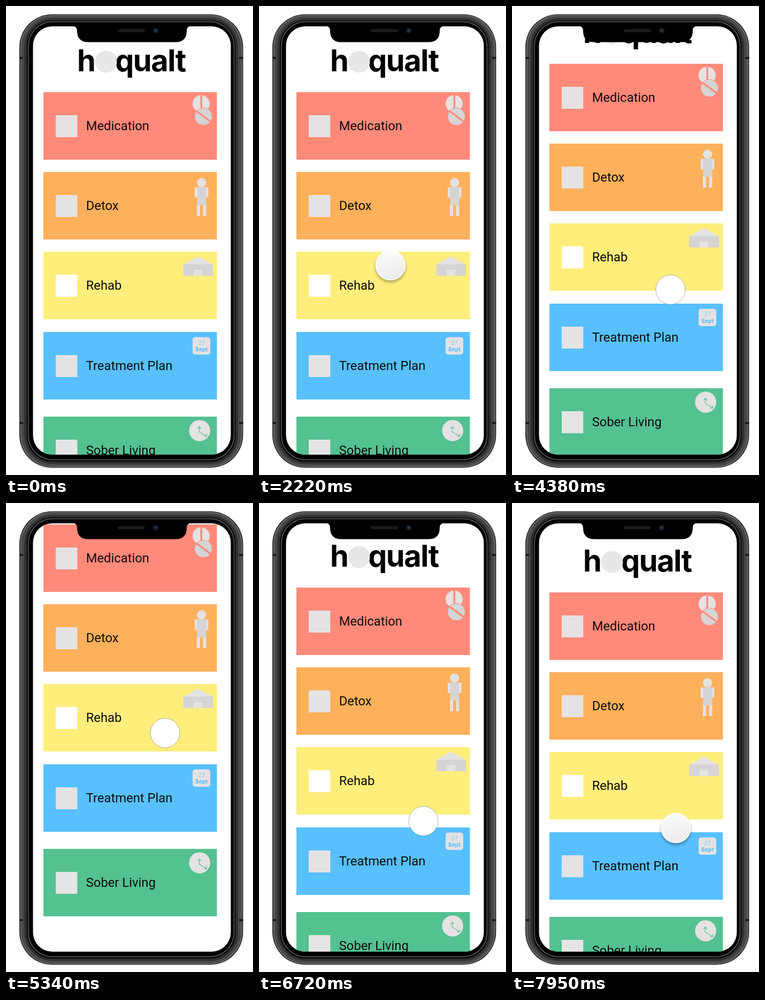
An HTML page for the animation above (8 s loop, 462x876 px).

```html
<!DOCTYPE html>
<html lang="en">
<head>
<meta charset="utf-8">
<title>Care plan app</title>
<style>
  html, body { margin: 0; width: 100%; height: 100%; overflow: hidden; background: #fff; }
  svg { display: block; width: 100vw; height: 100vh; }
  .label { font: 23.8px Roboto, sans-serif; fill: #0c0c0c; }
  .brand { font: 700 56px Inter, sans-serif; letter-spacing: -1.5px; fill: #000; }
  .date { font: 10.5px Inter, sans-serif; fill: #86cbf6; text-anchor: middle; }
  .date .month { font-weight: 700; fill: #58bdf9; }
  .lite { fill: #e4e2e2; }
  .mid { fill: #d6d4d4; }
</style>
</head>
<body>
<svg viewBox="0 0 462 876">
  <defs>
    <linearGradient id="ball" x1=".4" y1="0" x2=".6" y2="1">
      <stop offset="0" stop-color="#fcfcfc"/>
      <stop offset="1" stop-color="#ecebeb"/>
    </linearGradient>
    <filter id="blur" x="-30%" y="-30%" width="160%" height="160%">
      <feGaussianBlur stdDeviation="2.4"/>
    </filter>
    <clipPath id="screen"><rect x="50.5" y="38" width="370" height="800" rx="36"/></clipPath>
  </defs>

  <!-- phone body: steel band, then black bezel -->
  <rect x="25" y="15.5" width="418.5" height="847" rx="61" fill="#2a2b2b"/>
  <rect x="28" y="18" width="412.5" height="842" rx="58.5" fill="none" stroke="#6f7071" stroke-width="2"/>
  <rect x="32" y="21" width="404.5" height="836" rx="55" fill="none" stroke="#474848" stroke-width="5"/>
  <rect x="37" y="25" width="394.5" height="828" rx="50" fill="#0a0a0a" stroke="#2e2f2f" stroke-width="4"/>
  <rect x="42" y="29.5" width="384.5" height="818" rx="45" fill="#000" stroke="#5c5d5e" stroke-width="1.5"/>
  <path d="M25 97h7M436 97h7.5M25 779h7M436 779h7.5" stroke="#1b1b1b" stroke-width="4"/>
  <rect x="50.5" y="38" width="370" height="800" rx="36" fill="#fff"/>

  <g clip-path="url(#screen)">
    <g id="page">
      <text class="brand" x="133" y="122">h</text>
      <text class="brand" x="204" y="122">qualt</text>
      <circle cx="187" cy="104" r="20.5" fill="#e8e7e7"/>

      <g id="cards"></g>

      <!-- pills -->
      <circle class="lite" cx="365" cy="182.5" r="16"/>
      <path d="M365.3 166v33" stroke="#ff8a7a" stroke-width="3.4"/>
      <circle class="mid" cx="369.3" cy="206.5" r="16.4" stroke="#ff8a7a" stroke-width="1"/>
      <path d="M356 196l27 20" stroke="#ff8a7a" stroke-width="3.4"/>

      <!-- person -->
      <circle class="lite" cx="365.8" cy="329.8" r="8.6"/>
      <path class="lite" d="M353 338.5h25.5v19.5h-25.5zM357 371h6v21h-6zM368.5 371h6v21h-6z"/>
      <path class="mid" d="M357.5 338.5h17v33.5h-17z"/>

      <!-- house -->
      <path class="lite" d="M332 483l27-15.5 27.5 15.5z"/>
      <path class="mid" d="M331.5 482.5h55.5v21.5h-55.5z"/>
      <path class="lite" d="M351 493h16v11h-16z"/>

      <!-- calendar -->
      <rect class="lite" x="349" y="618.5" width="33" height="32.5" rx="5"/>
      <g class="date">
        <text x="365.5" y="632.5">27</text>
        <text class="month" x="365.5" y="645">Sept</text>
      </g>

      <!-- clock -->
      <circle class="lite" cx="362.2" cy="793" r="19.8"/>
      <path d="M375 803.5L361.5 795.5V786.5M358.5 789.5l3-3.500 3.500 3.500M370.500 804h5l-.5-5"
            fill="none" stroke="#55c191" stroke-width="1.2"/>
    </g>

    <g id="finger">
      <circle id="shade" cy="4" r="28.5" fill="#000" filter="url(#blur)"/>
      <circle r="27.5" fill="#fff" stroke="#666" stroke-width=".5"/>
      <circle id="raised" r="27.5" fill="url(#ball)" stroke="#fff" stroke-width="1.4"/>
    </g>
  </g>

  <!-- notch -->
  <path d="M124 37.5q9 0 9 9q0 21 21 21h163q21 0 21-21q0-9 9-9z" fill="#000"/>
  <rect x="209" y="43.3" width="51" height="5.6" rx="2.8" fill="#1b1b1d"/>
  <circle cx="280" cy="46" r="5.5" fill="#15171d"/>
  <circle cx="280" cy="46" r="2.4" fill="#24395a"/>
</svg>

<script>
const LOOP = 8000;
const $ = id => document.getElementById(id);

const cards = [
  ["Medication", 161, "#ff8a7a", "#e6e2e2"],
  ["Detox", 310, "#ffb05b", "#e5e3e1"],
  ["Rehab", 459, "#ffee7b", "#fff"],
  ["Treatment Plan", 609, "#58c0ff", "#e3e3e4"],
  ["Sober Living", 767, "#54c191", "#e5e5e5"]
];
$("cards").innerHTML = cards.map(([name, y, color, box]) => `
  <rect x="70" y="${y}" width="324.5" height="126" fill="${color}"/>
  <rect x="93" y="${y + 43}" width="40.3" height="41" fill="${box}"/>
  <text class="label" x="149.7" y="${y + 71}">${name}</text>`).join("");

// time, x, y
const path = [
  [0, 187, 104], [900, 225, 170], [1680, 265, 326], [2220, 246, 484],
  [2490, 254, 538], [3330, 306, 595], [3600, 307, 608], [3700, 307, 608],
  [4380, 296.5, 530], [5330, 297.5, 429.5], [6090, 308.5, 560],
  [6720, 307.5, 594], [7950, 306.5, 607]
];
// time, offset
const scroll = [
  [0, 0], [3700, 0], [4380, -53], [5330, -121], [6090, -38],
  [6720, -3], [7050, 3], [7950, 6]
];

// Monotone cubic through the points, flat at turning points and ends
function curve(keys, col, t) {
  const last = keys.length - 1;
  if (t >= keys[last][0]) return keys[last][col];
  const i = keys.findIndex(k => k[0] > t) - 1;
  const slope = j => (keys[j + 1][col] - keys[j][col]) / (keys[j + 1][0] - keys[j][0]);
  const tangent = j => {
    if (j === 0 || j === last) return 0;
    const a = slope(j - 1), b = slope(j);
    return a * b > 0 ? 2 * a * b / (a + b) : 0;
  };
  const h = keys[i + 1][0] - keys[i][0];
  const u = (t - keys[i][0]) / h, v = 1 - u;
  return keys[i][col] * (1 + 2 * u) * v * v + tangent(i) * h * u * v * v
       + keys[i + 1][col] * u * u * (3 - 2 * u) - tangent(i + 1) * h * u * u * v;
}

function ramp(t, from, to) {
  const u = Math.min(1, Math.max(0, (t - from) / (to - from)));
  return u * u * (3 - 2 * u);
}

function draw(t) {
  const x = curve(path, 1, t), y = curve(path, 2, t);
  const size = 0.745 + 0.255 * ramp(t, 0, 1200);
  const lift = 1 - ramp(t, 3420, 3600) + ramp(t, 7300, 7600);
  $("page").setAttribute("transform", `translate(0 ${curve(scroll, 1, t)})`);
  $("finger").setAttribute("transform", `translate(${x} ${y}) scale(${size})`);
  $("finger").setAttribute("visibility", t < 90 ? "hidden" : "visible");
  $("raised").setAttribute("opacity", lift);
  $("shade").setAttribute("opacity", 0.28 * lift * ramp(t, 0, 500));
}

const start = performance.now();
function tick() {
  draw((performance.now() - start) % LOOP);
  requestAnimationFrame(tick);
}
draw(0);
requestAnimationFrame(tick);
</script>
</body>
</html>
```
